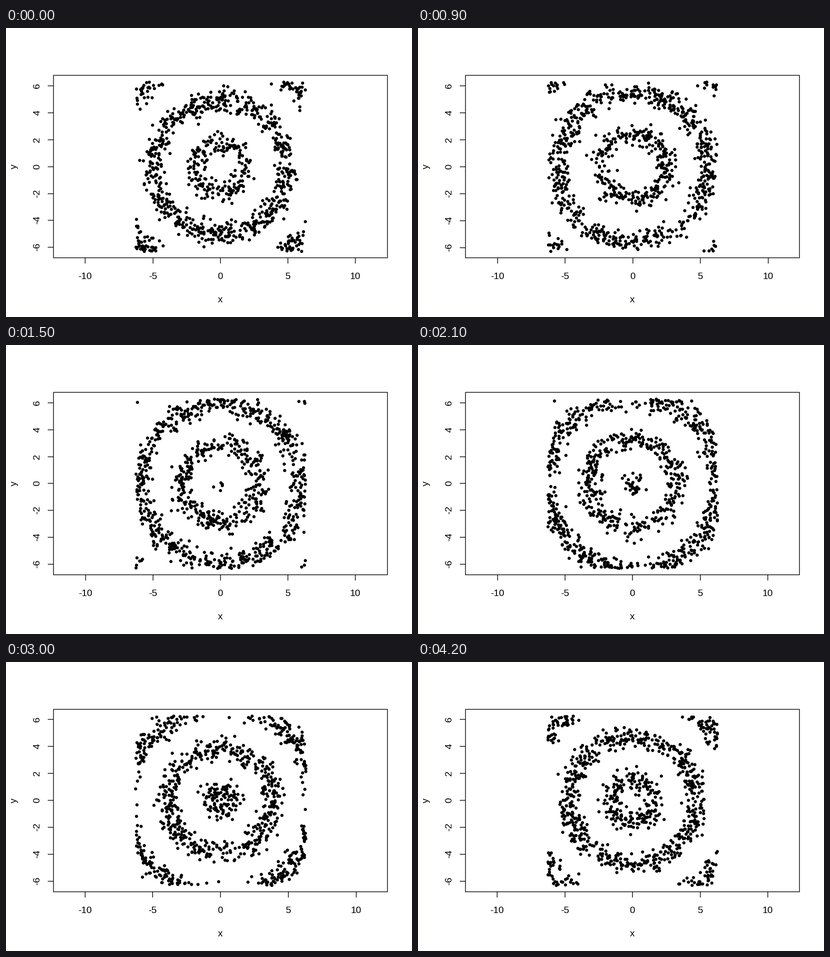
Write a matplotlib script that moves like this. It is 885x632 px and loops after 4.5 s.

```python
import numpy as np
import matplotlib.pyplot as plt
from matplotlib.animation import FuncAnimation

plt.rcParams["font.family"] = "Liberation Sans"

W, H, DPI = 885, 632, 64
PX = 72 / DPI                      # points per pixel
STEPS, STEP_MS = 15, 300
COUNT, HALF = 1000, 2 * np.pi
LEFT, RIGHT, TOP, BOTTOM = 103.5, 831.5, 103.5, 502.5
MID_X, MID_Y = (LEFT + RIGHT) / 2, (TOP + BOTTOM) / 2
MARGIN = 1.08                      # plot height relative to the data range
TICK = 12.5


def sample(step):
    """Rejection-sample points whose density is a wave moving outwards."""
    rng = np.random.default_rng(100 + step)
    phase = (step + 1) * np.pi / STEPS
    x, y = rng.uniform(-HALF, HALF, (2, 8 * COUNT))
    density = np.abs(np.sin(np.hypot(x, y) - phase)) ** 5
    keep = rng.random(x.size) < density
    return x[keep][:COUNT], y[keep][:COUNT]


def fit(x, y):
    """Origin and scale in pixels that centre the data, with equal axes."""
    scale = (BOTTOM - TOP) / (MARGIN * np.ptp(y))
    ox = MID_X - scale * (x.min() + x.max()) / 2
    oy = MID_Y + scale * (y.min() + y.max()) / 2
    return ox, oy, scale


def crisp(pos):
    return np.floor(pos) + 0.5


fig = plt.figure(figsize=(W / DPI, H / DPI), dpi=DPI, facecolor="white")
ax = fig.add_axes([0, 0, 1, 1])
ax.set_xlim(0, W)
ax.set_ylim(H, 0)
ax.axis("off")


def line(xs, ys):
    return ax.plot(xs, ys, color="black", lw=1.5 * PX, snap=False,
                   solid_capstyle="butt", solid_joinstyle="miter")[0]


def label(x, y, text, rotation=0):
    return ax.text(x, y, text, size=20.8 * PX, color="black", ha="center",
                   va="baseline", rotation=rotation, rotation_mode="anchor")


line([LEFT, RIGHT, RIGHT, LEFT, LEFT], [TOP, TOP, BOTTOM, BOTTOM, TOP])
label(MID_X - 0.5, 599.5, "x")
label(23, MID_Y - 0.5, "y", 90)

x_marks = [(v, line([0, 0], [BOTTOM, BOTTOM + TICK]), label(0, 549, str(v)))
           for v in range(-10, 11, 5)]
y_marks = [(v, line([LEFT - TICK, LEFT], [0, 0]), label(73.5, 0, str(v), 90))
           for v in range(-6, 7, 2)]
dots, = ax.plot([], [], "o", color="black", ms=6.9 * PX, mew=0)
clouds = [sample(step) for step in range(STEPS)]


def draw(step):
    x, y = clouds[step]
    ox, oy, scale = fit(x, y)
    dots.set_data(ox + scale * x, oy - scale * y)
    for value, mark, text in x_marks:
        pos = crisp(ox + scale * value)
        mark.set_xdata([pos, pos])
        text.set_x(pos - 0.5)
    for value, mark, text in y_marks:
        pos = crisp(oy - scale * value)
        mark.set_ydata([pos, pos])
        text.set_y(pos - 0.5)
    return [dots]


anim = FuncAnimation(fig, draw, frames=STEPS, interval=STEP_MS,
                     repeat=True, repeat_delay=0, blit=False)
plt.show()
```
